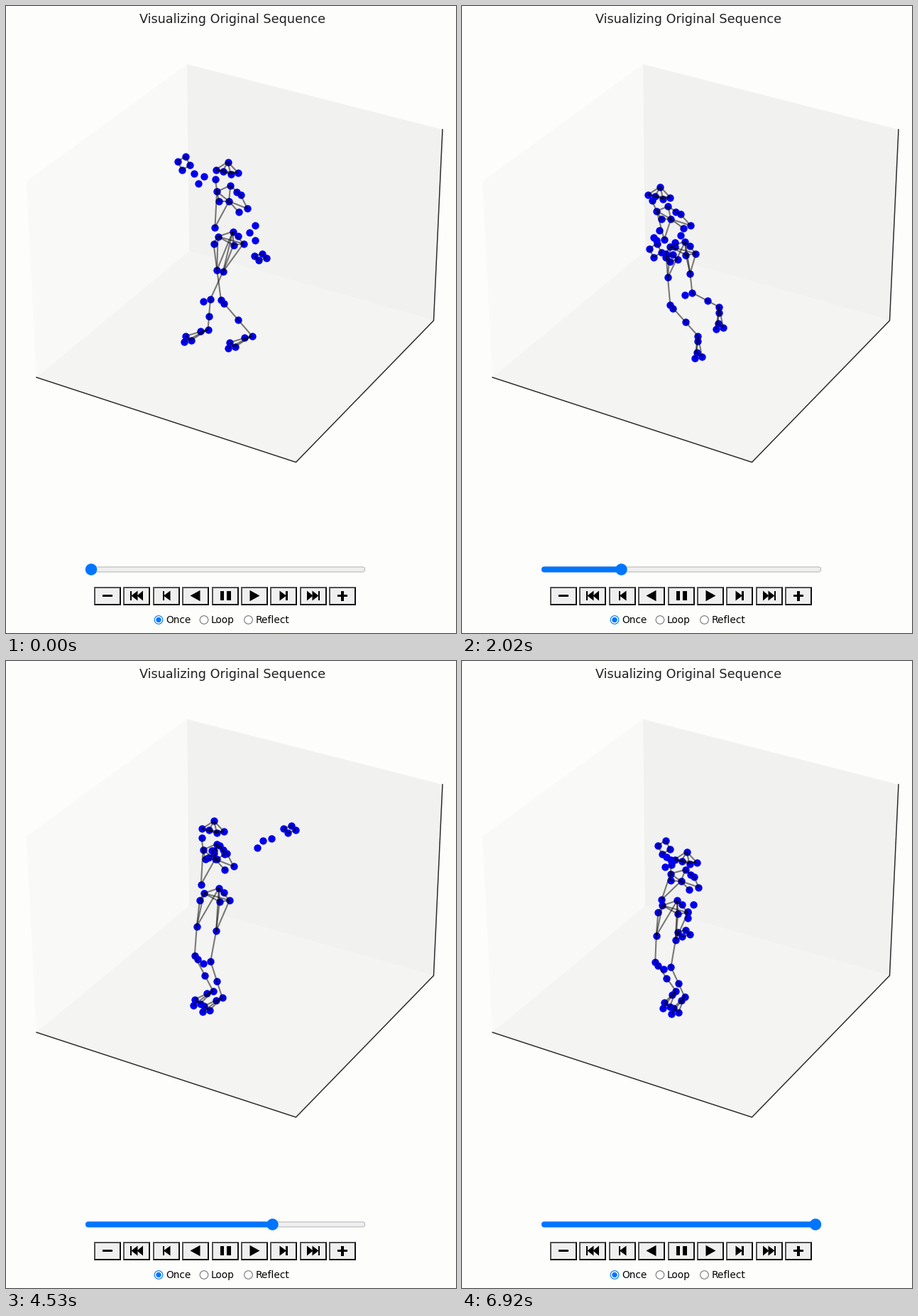
These frames come from a looping animation (634 by 883 pixels, 7070 ms). A matplotlib script:

```python
import numpy as np
import matplotlib.pyplot as plt
from matplotlib.animation import FuncAnimation
from matplotlib.collections import LineCollection
from matplotlib.patches import Circle, FancyBboxPatch, Polygon, Rectangle

W, H, DPI = 634, 883, 64
LOOP, STEP = 7070, 35
FIRST, HOLD, LAST, TICK = 200, 6770, 6920, 46

# Free ends of the body at a few moments; everything else follows from them
KEYS = np.array([FIRST, 830, 2020, 2980, 3980, 5070, LAST], float)
HEAD = [(312, 219), (307, 243), (279, 254), (277, 250), (302, 231), (283, 224), (316, 268)]
HAND_A = [(250, 221), (324, 320), (272, 344), (288, 318), (275, 193), (319, 347), (284, 262)]
HAND_B = [(358, 353), (336, 320), (294, 355), (382, 316), (404, 275), (388, 217), (312, 383)]
HEEL_B = [(284, 455), (310, 471), (361, 425), (388, 318), (279, 481), (338, 448), (313, 472)]

# Marker layouts; chest markers are in units of shoulder width and chest height
FACE = [(0, 0), (-17, 11), (-7, 13), (4, 17), (14, 15)]
CHEST = [(-.5, 0), (0, -.3), (0, .3), (-.38, .35), (.27, -.1),
         (.43, 0), (.74, .48), (.42, .66), (-.45, 1.35), (-.6, -.46)]

FACE_EDGES = [(0, 1), (0, 2), (0, 3), (0, 4), (1, 2), (1, 3), (2, 3), (3, 4), (2, 4)]
CHEST_EDGES = [(0, 1), (1, 4), (4, 5), (5, 6), (2, 6), (2, 7), (0, 2),
               (0, 3), (2, 3), (0, 8), (2, 8), (0, 9), (1, 2)]
HIP_EDGES = [(0, 2), (0, 4), (0, 5), (2, 4), (2, 5), (4, 5), (0, 1)]
HAND_EDGES = [(0, 1), (1, 2), (2, 3), (3, 0)]
LEG_EDGES = [(0, 1), (1, 3), (3, 4), (4, 6), (4, 7), (4, 8), (6, 8)]


def glide(path, t):
    """Smooth cubic through the key positions."""
    path = np.array(path, float)
    i = int(np.clip(np.searchsorted(KEYS, t, "right") - 1, 0, len(KEYS) - 2))
    span = KEYS[i + 1] - KEYS[i]
    s = (t - KEYS[i]) / span
    slope = np.gradient(path, KEYS, axis=0) * span
    return ((2 * s**3 - 3 * s**2 + 1) * path[i] + (s**3 - 2 * s**2 + s) * slope[i]
            + (3 * s**2 - 2 * s**3) * path[i + 1] + (s**3 - s**2) * slope[i + 1])


def mix(p, q, f):
    return p + (q - p) * f


def ring(center, count, rx, ry):
    a = 2 * np.pi * np.arange(count) / count + .25
    return center + np.column_stack([rx * np.cos(a), ry * np.sin(a)])


def body(t):
    points, edges = [], []

    def add(group, links=()):
        base = len(points)
        points.extend(group)
        edges.extend((base + a, base + b) for a, b in links)
        return base

    head, hand_a, hand_b, heel_b = (glide(p, t) for p in (HEAD, HAND_A, HAND_B, HEEL_B))

    # Weight shifts from side to side and settles
    tau = t - FIRST
    sway = 15 * np.exp(-tau / 4500) * np.cos(2 * np.pi * tau / 1820)
    core = np.array([296 + sway, 341 + .4 * (head[1] - 241)])
    heel_a = np.array([304 + 2.8 * sway, 464])

    add(head + FACE, FACE_EDGES)

    spine = mix(head, core, .37)
    left, right, waist = spine + (-15, 0), spine + (21, 5), mix(head, core, .72)
    mid = (left + right) / 2
    add([mid + a * (right - left) + b * (waist - mid) for a, b in CHEST], CHEST_EDGES)

    hip_a, hip_b = core + (-16, -3), core + (16, 3)
    hips = add([hip_a + (3, -5), hip_a + (-3, 5), core + (8, -15), core + (15, -9),
                hip_b + (-7, 1), hip_b + (7, -1)], HIP_EDGES)

    for shoulder, hand, size in ((left, hand_a, 10), (right, hand_b, 5)):
        elbow = mix(shoulder, hand, .5) + (1, 4)
        add([elbow + (4, -5), elbow - (4, -5), mix(elbow, hand, .4)])
        add(ring(hand, 4, 9, size), HAND_EDGES)

    # Feet point sideways while an arm is raised, else towards the viewer
    open_up = np.clip((300 - min(hand_a[1], hand_b[1])) / 80, 0, 1)
    for hip, heel, inner, joints in ((hip_a, heel_a, (4, 5), (0, 1, 2)),
                                     (hip_b, heel_b, (-10, 3), (4, 5, 2))):
        knee = mix(hip, heel, .5) + (-18, 17)
        toe = heel + (-30 * open_up, 28 - 14 * open_up)
        leg = add([mix(hip, knee, .5) + (-2, 0), knee, knee + inner,
                   mix(knee, heel, .56), heel, mix(heel, toe, .35) + (0, -2),
                   *ring(toe, 3, 6, 5)], LEG_EDGES)
        edges.extend((hips + k, leg) for k in joints)

    points = np.array(points)
    return points, points[np.array(edges)]


def pt(px):
    return px * 72 / DPI


fig = plt.figure(figsize=(W / DPI, H / DPI), dpi=DPI, facecolor="#fdfdfb")
ax = fig.add_axes([0, 0, 1, 1])
ax.set(xlim=(0, W), ylim=(H, 0))
ax.axis("off")


def poly(xy, color, **kw):
    return ax.add_patch(Polygon(xy, facecolor=color, linewidth=0, **kw))


def rect(x0, y0, x1, y1, color, **kw):
    ax.add_patch(Rectangle((x0, y0), x1 - x0, y1 - y0, facecolor=color, linewidth=0, **kw))


def pill(x0, y0, x1, y1, face, edge, z):
    style = f"round,pad=0,rounding_size={(y1 - y0) / 2}"
    return ax.add_patch(FancyBboxPatch((x0, y0), x1 - x0, y1 - y0, boxstyle=style,
                                       facecolor=face, edgecolor=edge,
                                       linewidth=pt(1), zorder=z))


def label(x, y, text, px, **kw):
    ax.text(x, y, text, fontsize=pt(px), family="DejaVu Sans", va="baseline", **kw)


# Room
TOP, RIGHT, BACK = (255, 82), (615, 174), (258, 345)
LEFT, FRONT, CORNER = (43, 523), (408.5, 642.5), (602.5, 443)
poly([(29, 247), TOP, BACK, LEFT], "#f9f9f8")
poly([TOP, RIGHT, CORNER, BACK], "#f1f1f0")
poly([LEFT, BACK, CORNER, FRONT], "#f4f4f2")
ax.plot(*zip(LEFT, FRONT, CORNER, RIGHT), color="#2b2b2b", lw=pt(1.5))
label(319, 23.5, "Visualizing Original Sequence", 17.6, ha="center", color="#222222")

# Slider
BLUE = "#0075ff"
pill(112.5, 790, 505.5, 797, "#efefef", "#b2b2b2", 2)
fill = pill(112.5, 790, 120, 797, BLUE, BLUE, 3)
thumb = ax.add_patch(Circle((120, 793.5), 8.2, facecolor=BLUE, linewidth=0, zorder=4))


# Player buttons
def arrow(x, tip, half):
    poly([(x, 830.5 - half), (x, 830.5 + half), (tip, 830.5)], "black", zorder=3)


def bar(x0, x1, half=6.8):
    rect(x0, 830.5 - half, x1, 830.5 + half, "black", zorder=3)


def icon(kind, c):
    if kind in "-+":
        bar(c - 7, c + 7, 1.8)
        if kind == "+":
            bar(c - 1.8, c + 1.8, 7)
    elif kind == "pause":
        bar(c - 7.5, c - 1.8)
        bar(c + 1.8, c + 7.5)
    else:
        d = -1 if kind.startswith("back") else 1
        if kind.endswith("play"):
            arrow(c - 6.5 * d, c + 7.5 * d, 7.7)
        elif kind.endswith("step"):
            arrow(c - 5.5 * d, c + 4 * d, 7)
            bar(c + 3 * d, c + 5.5 * d)
        else:
            arrow(c - 9 * d, c - .5 * d, 7)
            arrow(c - 1.5 * d, c + 7.5 * d, 7)
            bar(c + 6.7 * d, c + 9 * d)


for n, kind in enumerate(["-", "back end", "back step", "back play", "pause",
                          "play", "step", "end", "+"]):
    x = round(124 + 41.4 * n)
    rect(x, 818, x + 38, 844, "#111111")
    poly([(x, 818), (x + 38, 818), (x + 36, 820), (x + 2, 820),
          (x + 2, 842), (x, 844)], "#505050")
    rect(x + 2, 820, x + 36, 842, "#efefef")
    icon(kind, x + 19)

# Radio choices
for x, text in [(215, "Once"), (279, "Loop"), (341.5, "Reflect")]:
    on = text == "Once"
    ax.add_patch(Circle((x, 864.5), 5.8, facecolor="white",
                        edgecolor=BLUE if on else "#767676", linewidth=pt(1.1)))
    if on:
        ax.add_patch(Circle((x, 864.5), 3.7, facecolor=BLUE, linewidth=0))
    label(x + 10, 869, text, 13.8, color="black")

dots = ax.scatter([], [], s=pt(10.4) ** 2, c="#0000ee", linewidths=0, zorder=5)
bones = LineCollection([], colors="black", alpha=.5, linewidths=pt(2.1), zorder=6)
ax.add_collection(bones)


def clock(t):
    """Stepped playback time with a pause at both ends."""
    if t >= LAST:
        return LAST
    return FIRST + TICK * round((np.clip(t, FIRST, HOLD) - FIRST) / TICK)


def draw(n):
    t = clock((n + 1) * STEP)
    points, lines = body(t)
    dots.set_offsets(points + .5)
    bones.set_segments(lines + .5)
    x = np.clip(120 + .0597 * (t - 290), 120, 498)
    thumb.center = (x, 793.5)
    fill.set_width(x - 112.5)
    return dots, bones, thumb, fill


anim = FuncAnimation(fig, draw, frames=LOOP // STEP, interval=STEP,
                     repeat=True, repeat_delay=0, blit=False)
plt.show()
```
